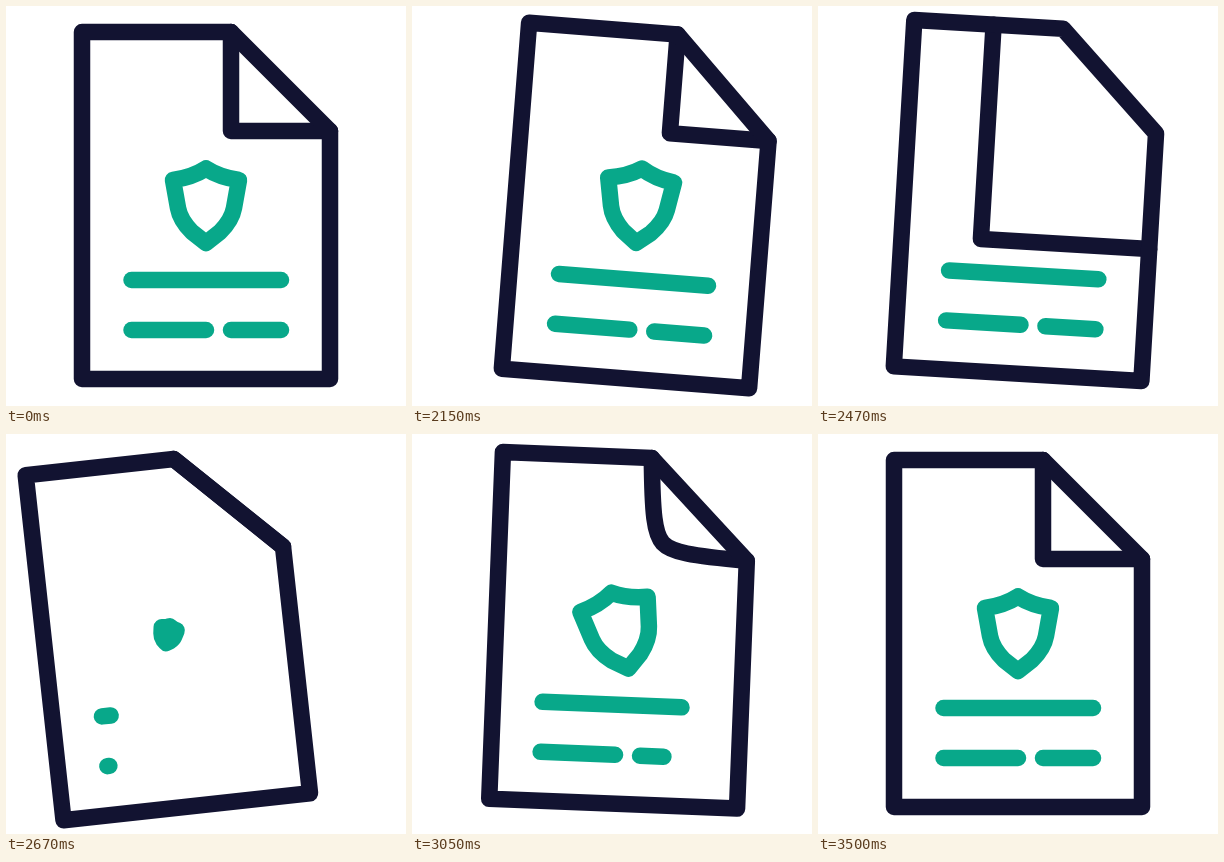
An HTML page with a canvas for the animation above (3520 ms loop, 400 by 400 pixels).

```html
<!DOCTYPE html>
<html>
<head>
<meta charset="utf-8">
<style>
  html, body { margin: 0; width: 100%; height: 100%; overflow: hidden; background: #fff; }
  canvas { display: block; width: 400px; height: 400px; }
</style>
</head>
<body>
<canvas id="stage" width="400" height="400"></canvas>
<script>
const ctx = document.getElementById('stage').getContext('2d');
const LOOP = 3520, DARK = '#121331', GREEN = '#08a88a';
const SWAP = 2575; // old page content is fully covered, new content starts

// Eased keyframe tracks: [time, value]
const tracks = {
  angle: [[1992, 0], [2312, 9.1], [2700, -6.5], [3150, 3.5], [3500, 0]],
  x: [[1992, 0], [2315, 55.5], [2632, -38], [2804, -39], [3141, 18], [3470, 0]],
  y: [[2310, 0], [2470, -5], [2640, 0], [2780, 6], [2940, 5], [3150, -10], [3440, 0]],
  turn: [[2330, 0], [2625, 1]],
  crease: [[2800, 0], [3190, 1]],
  line: [[2590, 0], [3140, 1]],
  pair: [[2625, 0], [3232, 1]],
  size: [[2578, 0], [2890, 1.08], [3230, 1]],
  tilt: [[2578, 0], [2690, 20], [3060, -15], [3420, 0]]
};

function at(name, t) {
  const keys = tracks[name];
  if (t <= keys[0][0]) return keys[0][1];
  for (let i = 1; i < keys.length; i++) {
    const [t0, a] = keys[i - 1], [t1, b] = keys[i];
    if (t < t1) {
      const u = (t - t0) / (t1 - t0);
      return a + (b - a) * u * u * (3 - 2 * u);
    }
  }
  return keys[keys.length - 1][1];
}

const page = new Path2D('M76 26H225L324 125V373H76Z');
const shield = new Path2D(
  'M0-37.5C-10-31-22-27.5-33-26L-28 2C-26 13-20 20-14 26L0 37L14 26C20 20 26 13 28 2L33-26C22-27.5 10-31 0-37.5Z');

function stroke(path, color) {
  ctx.strokeStyle = color;
  ctx.stroke(path);
}

function bar(x, y, length) {
  if (length > 0) stroke(new Path2D(`M${x} ${y}h${length}`), GREEN);
}

function content(line, pair, size, tilt) {
  const length = 124.5 * pair;
  bar(125.5, 274, 149.5 * line);
  bar(125.5, 324, Math.min(length, 74.5));
  bar(225, 324, length - 74.5);
  if (size > 0) {
    const path = new Path2D();
    path.addPath(shield, new DOMMatrix().translate(200, 200).rotate(tilt).scale(size));
    stroke(path, GREEN);
  }
}

// The folded corner sweeping across the sheet
function turnPage(p) {
  const x = 225 - 149 * p, y = 125 + 248 * p;
  ctx.fillStyle = '#fff';
  ctx.fill(new Path2D(`M${x} 26H225L324 125V${y}H${x}Z`));
  stroke(new Path2D(`M${x} 26V${y}H324`), DARK);
}

// A new corner bending out of the diagonal edge
function creaseCorner(p) {
  const q = 1 - p, x = 274.5 - 49.5 * p, y = 75.5 + 49.5 * p;
  const near = 33 * q * q, far = 33 + 33 * p, h = 30 * q;
  stroke(new Path2D(`M225 26C${225 + near} ${26 + far} ${x - h} ${y - h} ${x} ${y}` +
    `C${x + h} ${y + h} ${324 - far} ${125 - near} 324 125`), DARK);
}

function draw(t) {
  const v = name => at(name, t);
  ctx.clearRect(0, 0, 400, 400);
  ctx.save();
  ctx.translate(200 + v('x'), 199.5 + v('y'));
  ctx.rotate(v('angle') * Math.PI / 180);
  ctx.translate(-200, -199.5);
  ctx.lineWidth = 16.5;
  ctx.lineCap = ctx.lineJoin = 'round';
  if (t < SWAP) content(1, 1, 1, 0);
  if (t < 2625) turnPage(v('turn'));
  else creaseCorner(v('crease'));
  if (t >= SWAP) content(v('line'), v('pair'), v('size'), v('tilt'));
  stroke(page, DARK);
  ctx.restore();
}

const start = performance.now();
function tick() {
  draw((performance.now() - start) % LOOP);
  requestAnimationFrame(tick);
}
tick();
</script>
</body>
</html>
```
